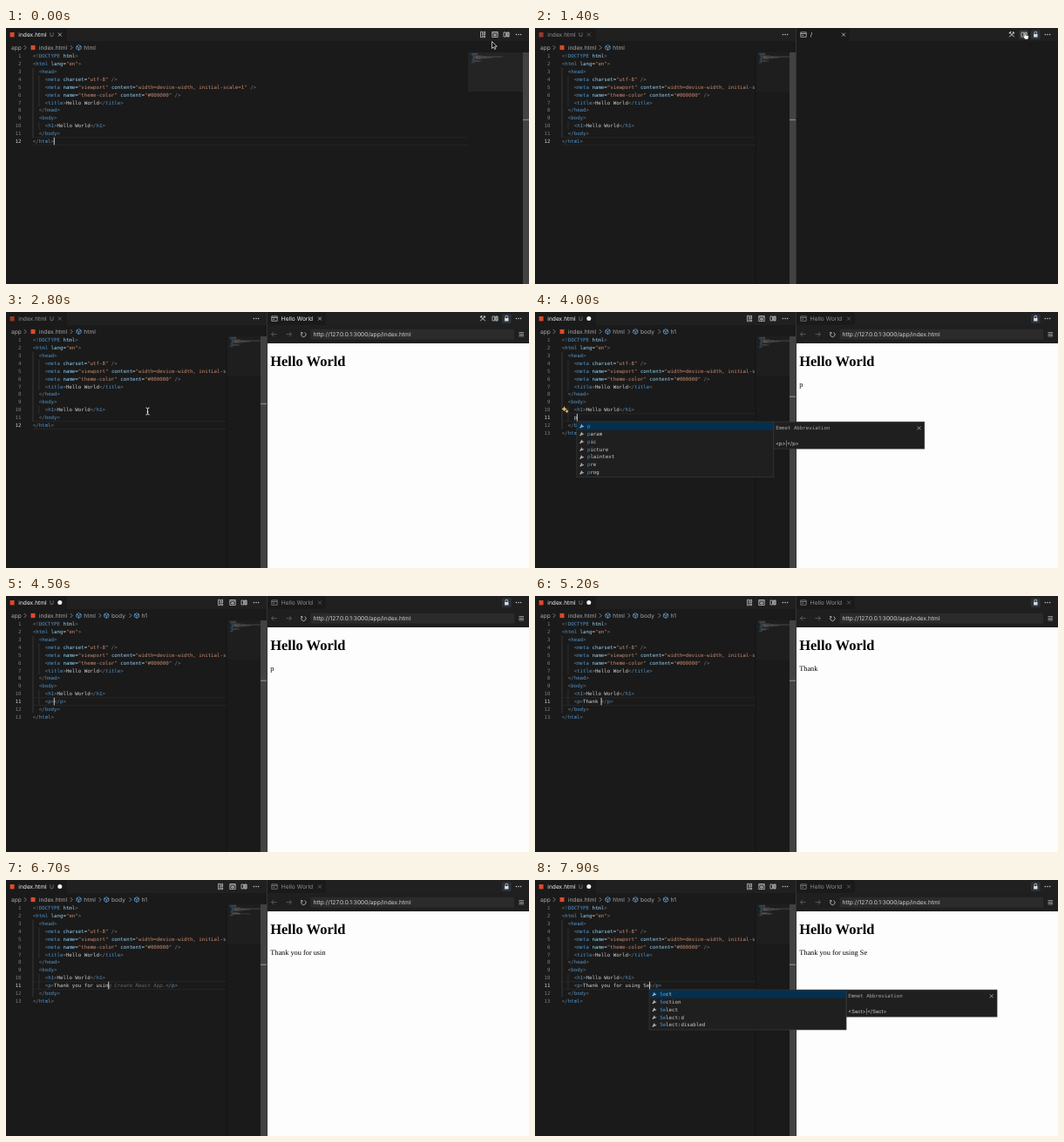
Recreate the animation shown at these times as an HTML page. Size 600 by 294 pixels, loop 8 s.

```html
<!DOCTYPE html>
<html lang="en">
<head>
<meta charset="utf-8">
<title>Editor with live preview</title>
<style>
html, body { margin: 0; width: 100%; height: 100%; overflow: hidden; background: #1a1a1a; }
#stage { display: block; width: 600px; height: 294px; }
text { white-space: pre; text-rendering: geometricPrecision; }
.ui { font: 6.65px Inter, Roboto, sans-serif; }
.code { font: 5.76px "DejaVu Sans Mono", "Liberation Mono", monospace; }
.h1 { font: bold 16.5px "Liberation Serif", serif; }
.p { font: 8.3px "Liberation Serif", serif; }
</style>
</head>
<body>
<svg id="stage" viewBox="0 0 600 294"></svg>
<script>
const LOOP = 8000, STEP = 100;
const CW = 3.468, LH = 8.86, X0 = 30.8, Y0 = 28.1;
const SPLIT = 900, TOOLBAR = 1500, PAGE = 1600, FOCUS = 2900, ENTER = 3300, KEY_P = 3600, EXPAND = 4500;

const HEAD = [
  '<!DOCTYPE html>', '<html lang="en">', '  <head>', '    <meta charset="utf-8" />',
  '    <meta name="viewport" content="width=device-width, initial-scale=1" />',
  '    <meta name="theme-color" content="#000000" />',
  '    <title>Hello World</title>', '  </head>', '  <body>', '    <h1>Hello World</h1>'
];
const TAIL = ['  </body>', '</html>'];
const PHRASE = 'Thank you for using Se';
const KEYS = [4700, 4800, 4900, 5000, 5100, 5200, 5400, 5500, 5600, 5700, 5900,
  6000, 6100, 6200, 6300, 6400, 6500, 6600, 6900, 7000, 7500, 7700];
const GHOST = 'g Create React App.';

// [from, to, typed prefix, suggestions]
const LISTS = [
  [3700, EXPAND, 'p', 'p param pic picture plaintext pre prog'],
  [4700, 4900, 'T', 'Table Tbody Td Template Textarea Tfoot Th Thead Time Title Tr Track'],
  [5900, 6000, 'f', 'fieldset figcaption figure footer form form:get form:post frame frameset fset fst ftr'],
  [6300, 6400, 'u', 'u ul ul+'],
  [7500, 7700, 'S', 'Samp Script Script:src Section Select Small Source Span Strong Style Sub Summary'],
  [7700, LOOP, 'Se', 'Sect Section Select Select:d Select:disabled']
];
// [time, x, y]
const POINTER = [[0, 557.5, 15.5], [300, 560.5, 5], [1300, 560.5, 5], [1700, 560.5, 5], [2400, 162.5, 114]];

const esc = s => s.replace(/&/g, '&amp;').replace(/</g, '&lt;').replace(/>/g, '&gt;');
const rect = (x, y, w, h, fill, more = '') => `<rect x="${x}" y="${y}" width="${w}" height="${h}" fill="${fill}" ${more}/>`;
const text = (cls, x, y, s, fill) => `<text class="${cls}" x="${x}" y="${y}" fill="${fill}">${esc(s)}</text>`;
const path = (d, stroke, w = .8, fill = 'none') => `<path d="${d}" stroke="${stroke}" stroke-width="${w}" fill="${fill}"/>`;
const at = (x, y, body) => `<g transform="translate(${x} ${y})">${body}</g>`;
const clip = (w, body) => `<svg width="${w}" height="294" overflow="hidden">${body}</svg>`;
const typed = t => PHRASE.slice(0, KEYS.filter(k => k <= t).length);

const cross = (x, y, c) => at(x, y, path('M-2-2L2 2M2-2L-2 2', c, .7));
const chevron = x => at(x, 22.5, path('M-1.2-2.4L1.2 0L-1.2 2.4', '#999', .8));
const cube = x => at(x, 22.5, path('M0-2.9L2.6-1.5V1.5L0 2.9L-2.6 1.5V-1.5ZM-2.6-1.5L0 0L2.6-1.5M0 0V2.9', '#6ab0ea', .7));
const dots = (x, c = '#ccc') => [-2.6, 0, 2.6].map(d => `<circle cx="${x + d}" cy="7.6" r=".75" fill="${c}"/>`).join('');
const diffIcon = x => at(x, 7.5, path('M-2.5-3.2H-.3V3.2H-2.5ZM1-3.2H2.6V.2H1ZM1 1.6H2.6V3.2H1Z', '#c5c5c5', .8));
const viewIcon = x => at(x, 7.5, path('M-3.2-3H3.2V3H-3.2ZM-3.2-1.5H3.2M-2 .8Q0-1.1 2 .8Q0 2.6-2 .8', '#c5c5c5', .8) + '<circle cy=".8" r=".6" fill="#ccc"/>');
const splitIcon = x => at(x, 7.5, path('M-3-2.5H-.5V2.5H-3ZM.7-2.5H3.1V2.5H.7Z', '#c5c5c5', .8) + rect(.7, -2.5, 2.4, 5, '#c5c5c5', 'opacity=".5"'));
const lockIcon = x => rect(x - 5.3, 2.3, 10.6, 10.6, '#2b323a', 'rx="1.5"') +
  at(x, 7.5, rect(-2.2, -.6, 4.4, 3.7, '#ddd', 'rx=".4"') + path('M-1.4-.6V-1.9A1.4 1.4 0 0 1 1.4-1.9V-.6', '#ddd', .8));
const toolsIcon = x => at(x, 7.5, path('M-2.8 2.8L2.2-2.2M2.8 2.8L-1.4-1.4', '#d5d5d5', 1) + path('M-3-1.2L-.8-3.2M1.2-3L2.8-1.3', '#d5d5d5', 1.3));
const pageIcon = (x, c) => at(x, 7.6, path('M-3.2-2.7H3.2V2.7H-3.2ZM-3.2-1.1H3.2M-1.8.8H.2', c, .8));
const wrench = (x, y) => at(x, y, path('M-2 2L.8-.8', '#ccc', 1.2) + path('M.3-1.9A1.4 1.4 0 1 0 2.1-.2', '#ccc', .9));

// splits a line into [text, colour, style]
function tokens(line) {
  const out = [];
  for (const part of line.match(/<[^>]*>|[^<]+/g) || []) {
    if (part[0] !== '<') { out.push([part, '#d0d0d0']); continue; }
    for (const m of part.match(/<[!\/]?|"[^"]*"|[\w-]+|\/?>|=|\s+/g)) {
      const last = out[out.length - 1];
      const c = /^[<>\/]/.test(m) ? '#7b7b7b' : m[0] === '"' ? '#c88c72' : m === '=' ? '#d0d0d0'
        : last && last[0][0] === '<' ? '#4f94cd' : '#96d2f2';
      out.push([m, c]);
    }
  }
  return out;
}

function bodyLine(t) {
  if (t < KEY_P) return [['    ', '#d0d0d0']];
  if (t < EXPAND) return [['    p', '#d0d0d0']];
  const s = typed(t), ghost = t >= 6600 && t < 7500 ? GHOST.slice(s.length - 18) : '';
  return [...tokens('    <p>' + s), [ghost, '#686868', 'font-style="italic"'], ...tokens('</p>')];
}

function caretAt(t) {
  if (t < SPLIT) return t < 300 || t >= 800 ? [12, 7] : null;
  if (t < FOCUS) return null;
  if (t < ENTER) return [10, 24];
  return [11, t < KEY_P ? 4 : t < EXPAND ? 5 : 7 + typed(t).length];
}

function minimap(rows, x) {
  return rows.map((row, i) => {
    let col = 0;
    return row.map(([s, c]) => {
      const lead = s.length - s.trimStart().length, w = s.trim().length;
      const bar = w ? rect((x + (col + lead) * .5).toFixed(2), (28.8 + i * .98).toFixed(2), w * .5, .65, c, 'opacity=".5"') : '';
      col += s.length;
      return bar;
    }).join('');
  }).join('');
}

function editor(t, W) {
  const focused = t < SPLIT || t >= FOCUS, grown = t >= ENTER;
  const rows = HEAD.map(tokens);
  if (grown) rows.push(bodyLine(t));
  rows.push(...TAIL.map(tokens));
  const active = t < FOCUS ? 12 : grown ? 11 : 10;
  const edge = W === 600 ? 530 : 253, bar = W - 7;
  const top = n => Y0 + (n - 1) * LH;

  // tabs
  let s = rect(0, 0, W, 294, '#1a1a1a') + rect(0, 0, W, 15, '#202020') + rect(0, 0, 70, 15, '#1a1a1a');
  s += rect(4.6, 5, 5, 5.4, focused ? '#dc4a2a' : '#9b3a25');
  s += text('ui', 14.3, 10, 'index.html', focused ? '#f0f0f0' : '#8f8f8f') + text('ui', 50, 10, 'U', '#8a8f8a');
  s += grown ? '<circle cx="61.8" cy="7.6" r="2.5" fill="#f2f2f2"/>' : cross(61.8, 7.6, focused ? '#ddd' : '#777');
  if (t >= 200 && t < SPLIT) s += rect(W - 44.3, 2.3, 10.6, 10.6, '#303030', 'rx="1.5"');
  if (focused) s += diffIcon(W - 53) + viewIcon(W - 39) + splitIcon(W - 26);
  s += dots(W - 12);

  // breadcrumbs
  const crumb = (x, w) => text('ui', x, 24.9, w, '#a8a8a8');
  s += crumb(6, 'app') + chevron(22) + rect(28.5, 19.9, 5, 5.2, '#dc4a2a') + crumb(37.8, 'index.html') + chevron(75) + cube(83.5) + crumb(89.3, 'html');
  if (t >= FOCUS) s += chevron(107.8) + cube(115.3) + crumb(121, 'body') + chevron(142.7) + cube(150) + crumb(155.5, 'h1');

  // code
  let code = path(`M${X0} ${top(active)}H${edge}M${X0} ${top(active) + LH}H${edge}`, '#292929', .8);
  const last = rows.length - 1;
  code += path(`M31 ${top(3)}V${top(last + 1)}`, '#4b4b4b', .6);
  code += path(`M38 ${top(4)}V${top(8)}M38 ${top(10)}V${top(last)}`, '#3d3d3d', .6);
  rows.forEach((row, i) => {
    const y = (top(i + 1) + 6.35).toFixed(2);
    code += `<text class="code" x="17.4" y="${y}" text-anchor="end" fill="${i + 1 === active ? '#d0d0d0' : '#7c7c7c'}">${i + 1}</text>`;
    code += `<text class="code" x="${X0}" y="${y}">` +
      row.map(([w, c, st = '']) => `<tspan fill="${c}" ${st}>${esc(w)}</tspan>`).join('') + '</text>';
  });
  if (t >= 3700 && t < EXPAND) {
    const star = (x, y, r) => at(x, y, `<path d="M0 ${-r}Q0 0 ${r} 0Q0 0 0 ${r}Q0 0 ${-r} 0Q0 0 0 ${-r}" fill="#f0c070" stroke="#f0c070" stroke-width=".8"/>`);
    code += star(33.6, 111.4, 2.6) + star(36.6, 114, 1.5);
  }
  const c = caretAt(t);
  if (c) code += rect(X0 + c[1] * CW - .3, top(c[0]) + .2, 1, LH - .4, '#cfcfcf');
  s += clip(edge, code);

  // minimap and scrollbar
  s += rect(edge, 28, bar - edge, 45, '#fff', `opacity="${W === 600 ? .045 : .015}"`);
  if (W < 600) s += rect(edge - .5, 28, 1, 266, '#131313');
  s += clip(bar, minimap(rows, edge + 3.5));
  const hot = t >= 2000 && t < 2200;
  s += rect(bar, 28, 7, 266, hot ? '#555' : '#424242');
  s += rect(bar, grown ? 96.6 : 104.8, 7, 1.3, '#858585');
  return clip(W, s);
}

function preview(t) {
  const focused = t < FOCUS, loaded = t >= PAGE;
  const ink = focused ? '#f0f0f0' : '#8f8f8f';
  const tabEnd = loaded ? 367 : 361;
  let s = rect(299, 0, 301, 294, '#1a1a1a') + rect(299, 0, 301, 15, '#202020') + rect(300, 0, tabEnd - 300, 15, '#1a1a1a') + rect(299, 0, 1, 294, '#333');
  s += pageIcon(308, focused ? '#bbb' : '#808080') + text('ui', 315.8, 10, loaded ? 'Hello World' : '/', ink);
  s += cross(loaded ? 360 : 354, 7.6, focused ? '#ddd' : '#707070');
  if (focused) {
    if (t < 1800) s += rect(555.5, 2.3, 10.6, 10.6, '#333', 'rx="1.5"');
    s += toolsIcon(547) + splitIcon(561);
  }
  s += lockIcon(574.3) + dots(588);
  if (t >= TOOLBAR) {
    s += rect(300, 15, 300, 21, '#1f1f1f') + rect(349.5, 19.8, 233.5, 11.8, '#2b2b2b');
    s += at(307.5, 25.6, path('M3-0H-3M-.4-2.6L-3 0L-.4 2.6', '#666', .8));
    s += at(324.5, 25.6, path('M-3 0H3M.4-2.6L3 0L.4 2.6', '#666', .8));
    s += at(341.3, 25.8, path('M-1.8-1.9A2.7 2.7 0 1 0 1.4-2.3M-3.1-2.3H-1.4V-.5', '#c8c8c8', .8));
    s += text('ui', 352.6, 28.1, 'http://127.0.0.1:3000/app/index.html', '#d0d0d0');
    s += at(591.3, 25.7, path('M-2.8-2.2H2.8M-2.8-.7H2.8M-2.8.8H2.8M-2.8 2.3H2.8', '#b0b0b0', .7));
  }
  if (loaded) {
    s += rect(300, 36, 300, 258, '#fdfdfd') + text('h1', 303.2, 62.4, 'Hello World', '#000');
    const late = t - 100;
    s += text('p', 303.2, 85.5, late < KEY_P ? '' : late < EXPAND ? 'p' : typed(late), '#000');
  }
  return s;
}

function suggest(t) {
  const hit = LISTS.find(([a, b]) => t >= a && t < b);
  if (!hit) return '';
  const [from, , prefix, words] = hit, items = words.split(' ');
  const x = X0 + caretAt(t)[1] * CW - .3, y = 126.1, w = 226, h = items.length * LH + 1.6;
  const frame = 'stroke="#3e3e3e" stroke-width=".6"';
  let s = rect(x, y, w, h, '#1f1f1f', frame) + rect(x + .4, y + .6, w - .8, LH, '#04304f');
  items.forEach((item, i) => {
    const ty = y + .6 + i * LH;
    s += wrench(x + 5.8, ty + 4.4);
    s += `<text class="code" x="${x + 12.1}" y="${ty + 6.3}" fill="#cfcfcf"><tspan fill="#2ba0f0">${prefix}</tspan>${esc(item.slice(prefix.length))}</text>`;
  });
  if (t >= from + 100 || prefix !== 'p') {
    const dx = x + w;
    s += rect(dx, y, 173, 31, '#1f1f1f', frame) + text('code', dx + 2.3, 134.7, 'Emmet Abbreviation', '#a8a8a8') + cross(dx + 166.7, 133.3, '#c5c5c5');
    s += `<g font-size="5.8">${text('doc', dx + 2.3, 152.6, `<${items[0]}>|</${items[0]}>`, '#d0d0d0').replace('class="doc"', 'font-family="Inter, Roboto, sans-serif"')}</g>`;
  }
  return s;
}

function pointer(t) {
  if (t >= ENTER) return '';
  let [, x, y] = POINTER[POINTER.length - 1];
  for (let i = 1; i < POINTER.length; i++) {
    const [a, ax, ay] = POINTER[i - 1], [b, bx, by] = POINTER[i];
    if (t <= b) {
      const k = (t - a) / (b - a), e = k * k * (3 - 2 * k);
      x = ax + (bx - ax) * e; y = ay + (by - ay) * e;
      break;
    }
  }
  let d;
  if (t >= SPLIT && t < 1800)
    d = path('M.6 1Q1.2-.3 2 .8L2.4 3.2L5.2 3.8Q6 4 5.8 5.2L5 8H1.8L-.6 5Q-.8 3.8.8 4.4Z', '#222', .5, '#fff');
  else if (x < 253)
    d = path('M-2-4Q0-4 0-2.6Q0-4 2-4M0-2.8V2.8M-2 4Q0 4 0 2.6Q0 4 2 4M-1 .8H1', '#eee', .9);
  else
    d = path('M0 0V8L1.9 6.2L3.1 8.9L4.4 8.3L3.2 5.7H5.8Z', '#fff', .7, '#000');
  return at(x.toFixed(2), y.toFixed(2), d);
}

const stage = document.getElementById('stage');
const start = performance.now();
let shown = -1;

function draw() {
  const t = Math.floor(((performance.now() - start) % LOOP) / STEP) * STEP;
  if (t !== shown) {
    shown = t;
    const split = t >= SPLIT;
    stage.innerHTML = editor(t, split ? 299 : 600) + (split ? preview(t) : '') + suggest(t) + pointer(t);
  }
  requestAnimationFrame(draw);
}
draw();
</script>
</body>
</html>
```
